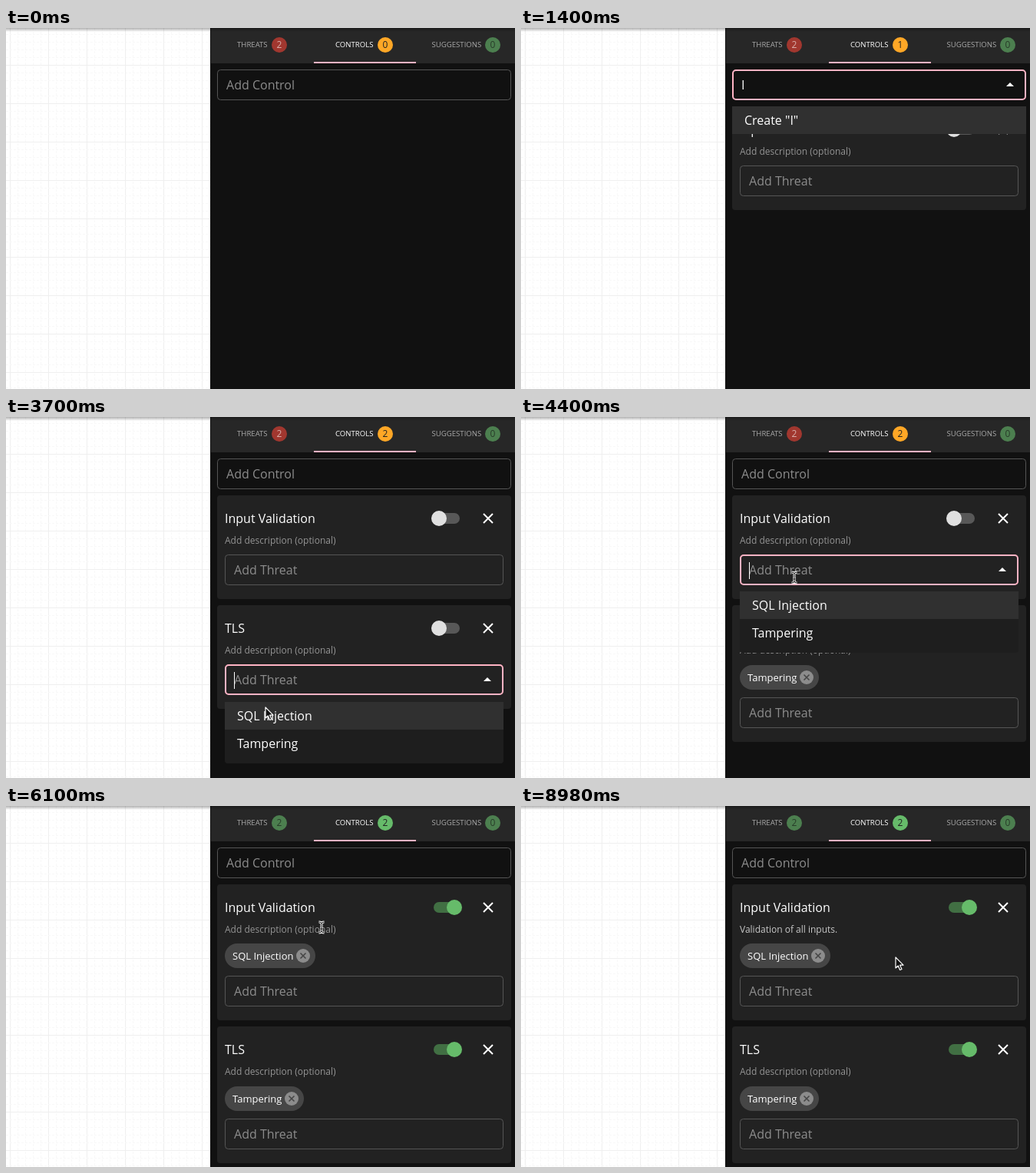
An HTML page with a canvas that plays this animation: 663 px wide and 470 px high, repeating every 9.16 s.

```html
<!DOCTYPE html>
<html lang="en">
<head>
<meta charset="utf-8">
<title>Threat controls</title>
<style>
  html, body { margin: 0; width: 100%; height: 100%; overflow: hidden; background: #fff; }
  canvas { display: block; width: 663px; height: 470px; }
</style>
</head>
<body>
<canvas id="stage" width="663" height="470"></canvas>
<script>
const ctx = document.getElementById('stage').getContext('2d');
const LOOP = 9160;
const PINK = '#ffb3c4', GREEN = '#66bb6a', ORANGE = '#ffa726', RED = '#f44336';
const CONTROL = 'Input Validation', NOTE = 'Validation of all inputs.';
const THREATS = ['SQL Injection', 'Tampering'];

// Pointer path as [time, x, y]; it is hidden while typing.
const PATH = [
  [3300, 345, 110], [3500, 338, 343], [3600, 338, 350], [3700, 338, 378],
  [3900, 338, 424], [4000, 338, 424], [4300, 356, 209], [4400, 356, 209],
  [4600, 345, 243], [4700, 345, 243], [5000, 570, 130], [5200, 570, 130],
  [5500, 572, 315], [5700, 572, 315], [6100, 411, 158], [8400, 411, 158],
  [8800, 480, 193], [8980, 488, 197]
];

let now = 0, pointer = null, overText = false;

const between = (a, b) => now >= a && now < b;
const ramp = (a, b) => Math.min(1, Math.max(0, (now - a) / (b - a)));
const typed = (start, steps, chars) => now < start ? 0 :
  Math.min(chars, Math.ceil(((now - start) / 100 + 1) * chars / steps));

function pointerAt() {
  if (now < PATH[0][0] || between(6500, 8400)) return null;
  const i = PATH.findIndex(key => key[0] >= now);
  if (i <= 0) return { x: PATH[0][1], y: PATH[0][2] };
  const [t0, x0, y0] = PATH[i - 1], [t1, x1, y1] = PATH[i];
  const k = (now - t0) / (t1 - t0);
  return { x: x0 + (x1 - x0) * k, y: y0 + (y1 - y0) * k };
}

function inside(x, y, w, h) {
  return pointer && pointer.x > x && pointer.x < x + w && pointer.y > y && pointer.y < y + h;
}

function box(x, y, w, h, color, r = 0) {
  ctx.fillStyle = color;
  ctx.beginPath();
  ctx.roundRect(x, y, w, h, r);
  ctx.fill();
}

function dot(x, y, r, color) {
  ctx.fillStyle = color;
  ctx.beginPath();
  ctx.arc(x, y, r, 0, 7);
  ctx.fill();
}

// Text is centred vertically on cy; returns its width.
function text(str, x, cy, size, color, align = 'left') {
  ctx.font = `${size}px "Open Sans", sans-serif`;
  ctx.textAlign = align;
  ctx.fillStyle = color;
  ctx.fillText(str, x, Math.round(cy + size * .36));
  return ctx.measureText(str).width;
}

function cross(x, y, r, color, width) {
  ctx.strokeStyle = color;
  ctx.lineWidth = width;
  ctx.beginPath();
  ctx.moveTo(x - r, y - r); ctx.lineTo(x + r, y + r);
  ctx.moveTo(x + r, y - r); ctx.lineTo(x - r, y + r);
  ctx.stroke();
}

function drawGrid() {
  box(0, 0, 266, 470, '#fff');
  ctx.lineWidth = 1;
  const line = (major, x0, y0, x1, y1) => {
    ctx.strokeStyle = major ? '#efefef' : '#f8f8f8';
    ctx.setLineDash(major ? [] : [3, 2]);
    ctx.beginPath();
    ctx.moveTo(x0, y0); ctx.lineTo(x1, y1);
    ctx.stroke();
  };
  for (let i = 0; i < 47; i++) {
    const x = 5.5 + i * 10, y = 8.5 + i * 10;
    if (x < 266) line(i % 5 === 0, x, 0, x, 470);
    line(i % 5 === 4, 0, y - .5 + .5, 266, y);
  }
  ctx.setLineDash([]);
}

function tab(label, x, badgeX, count, color, digit, active) {
  ctx.globalAlpha = active ? 1 : .6;
  text(label, x, 21.5, 9.6, '#fff');
  dot(badgeX, 22, 10, color);
  text(count, badgeX, 22, 12, digit, 'center');
  ctx.globalAlpha = 1;
}

function drawTabs() {
  box(267, 0, 396, 46, '#272727');
  const safe = now >= 5600, half = now >= 5100;
  tab('THREATS', 301, 356, 2, safe ? GREEN : half ? ORANGE : RED, half ? '#111' : '#fff');
  tab('CONTROLS', 429, 494, now < 1000 ? 0 : now < 3100 ? 1 : 2, safe ? GREEN : ORANGE, '#222', true);
  tab('SUGGESTIONS', 554.5, 634, 0, GREEN, '#111');
  box(401, 44, 133, 2, PINK);
  const shade = ctx.createLinearGradient(0, 0, 0, 5);
  shade.addColorStop(0, 'rgba(0,0,0,.3)');
  shade.addColorStop(1, 'rgba(0,0,0,0)');
  box(0, 0, 663, 5, shade);
}

function field(x, y, w, placeholder, { value = '', focus = false, hover = false, caret = false } = {}) {
  const over = inside(x, y, w, 40);
  overText = overText || over;
  const width = focus ? 2 : 1;
  ctx.lineWidth = width;
  ctx.strokeStyle = focus ? PINK : hover || over ? '#9a9a9a' : '#555';
  ctx.beginPath();
  ctx.roundRect(x + width / 2, y + width / 2, w - width, 40 - width, 4);
  ctx.stroke();
  text(value || placeholder, x + 12, y + 20, 16, value ? '#fff' : '#8c8c8c');
  if (caret) box(x + 12, y + 10, 1, 22, '#fff');
  if (focus) {
    const ax = x + w - 21, ay = y + 22;
    ctx.fillStyle = '#fff';
    ctx.beginPath();
    ctx.moveTo(ax - 5, ay); ctx.lineTo(ax, ay - 5); ctx.lineTo(ax + 5, ay);
    ctx.fill();
  }
}

function menu(x, y, w, options) {
  const single = options.length === 1;
  box(x, y, w, options.length * 36 + (single ? 0 : 8), '#1e1e1e', [0, 0, 4, 4]);
  const hovered = options.findIndex((_, i) => inside(x, y + i * 36, w, 36));
  box(x, y + Math.max(0, hovered) * 36, w, 36, '#303030');
  options.forEach((option, i) => text(option, x + 16, y + 18 + i * 36, 16, '#fff'));
}

function toggle(x, y, on) {
  box(x - 7, y - 7, 34, 14, on > .5 ? '#416f43' : '#585858', 7);
  dot(x + 20 * on, y, 10, on > .5 ? GREEN : '#e0e0e0');
}

function chip(label, y) {
  ctx.font = '13px "Open Sans", sans-serif';
  const w = ctx.measureText(label).width;
  box(285, y, Math.round(w + 38.5), 32, '#464646', 16);
  text(label, 295, y + 16, 13, '#fff');
  const cx = Math.round(295 + w + 12.5);
  dot(cx, y + 16, 9, '#8c8c8c');
  cross(cx, y + 16, 3.5, '#464646', 1.6);
}

function card({ title, y, note = '', editing, threat, on, open, nudge = 0 }) {
  box(275, y, 383, (threat ? 177 : 135) + nudge, '#222', 4);
  text(title, 285, y + 30, 16, '#fff');
  toggle(564, y + 30, on);
  cross(628, y + 30, 6, '#fff', 2);
  const w = text(note || 'Add description (optional)', 285, y + 58.5, 12, note ? '#c8c8c8' : '#949494');
  if (editing) box(Math.round(285 + (note ? w + 1 : 0)), y + 51, 1, 15, '#fff');
  overText = overText || inside(285, y + 48, 363, 20);
  if (threat) chip(threat, y + 77 + nudge);
  field(285, y + (threat ? 119 + nudge : 77), 363, 'Add Threat', { focus: open, caret: open });
}

function drawCards() {
  const first = {
    title: CONTROL, y: 102, on: ramp(5000, 5200), open: between(4300, 4600),
    threat: now >= 4600 && THREATS[0], editing: between(6400, 8400),
    note: NOTE.slice(0, typed(6600, 7, 10) + typed(7400, 10, 15))
  };
  const second = {
    title: 'TLS', y: first.threat ? 287 : 245, on: ramp(5500, 5700),
    open: between(3600, 4000), threat: now >= 4000 && THREATS[1], nudge: now >= 4000 ? 1 : 0
  };
  if (now >= 1000) card(first);
  if (now >= 3100) card(second);
  if (first.open) menu(285, 227, 363, THREATS);
  if (second.open) menu(285, 371, 363, THREATS);
}

function drawAddControl() {
  let value = '';
  if (between(1400, 2900)) value = CONTROL.slice(0, 1 + typed(1600, 3, 4) + typed(2000, 8, 11));
  if (between(3000, 3100)) value = 'TLS';
  field(275, 54, 383, 'Add Control', { value, focus: between(1100, 3100), hover: between(400, 1100) });
  if (value) menu(275, 102, 383, [`Create "${value}"`]);
}

function drawPointer() {
  if (!pointer) return;
  ctx.save();
  ctx.translate(Math.round(pointer.x), Math.round(pointer.y));
  ctx.lineJoin = 'round';
  const shape = new Path2D(overText
    ? 'M-3.5 -7Q0 -7 0 -5Q0 -7 3.5 -7M0 -5V5M-3.5 7Q0 7 0 5Q0 7 3.5 7M-2 2H2'
    : 'M0 0V14L3.2 11L5.6 16.5L8 15.5L5.6 10.2H10Z');
  if (overText) {
    ctx.strokeStyle = '#fff'; ctx.lineWidth = 3; ctx.stroke(shape);
    ctx.strokeStyle = '#111'; ctx.lineWidth = 1; ctx.stroke(shape);
  } else {
    ctx.fillStyle = '#111'; ctx.fill(shape);
    ctx.strokeStyle = '#fff'; ctx.lineWidth = 1.2; ctx.stroke(shape);
  }
  ctx.restore();
}

function draw(ms) {
  const t = ms % LOOP;
  now = t >= 8980 ? 8980 : Math.min(8800, Math.floor(t / 100) * 100);
  pointer = pointerAt();
  overText = false;
  drawGrid();
  box(266, 0, 397, 470, '#111');
  drawTabs();
  drawCards();
  drawAddControl();
  drawPointer();
}

const start = performance.now();
function tick() {
  draw(performance.now() - start);
  requestAnimationFrame(tick);
}
tick();
</script>
</body>
</html>
```
